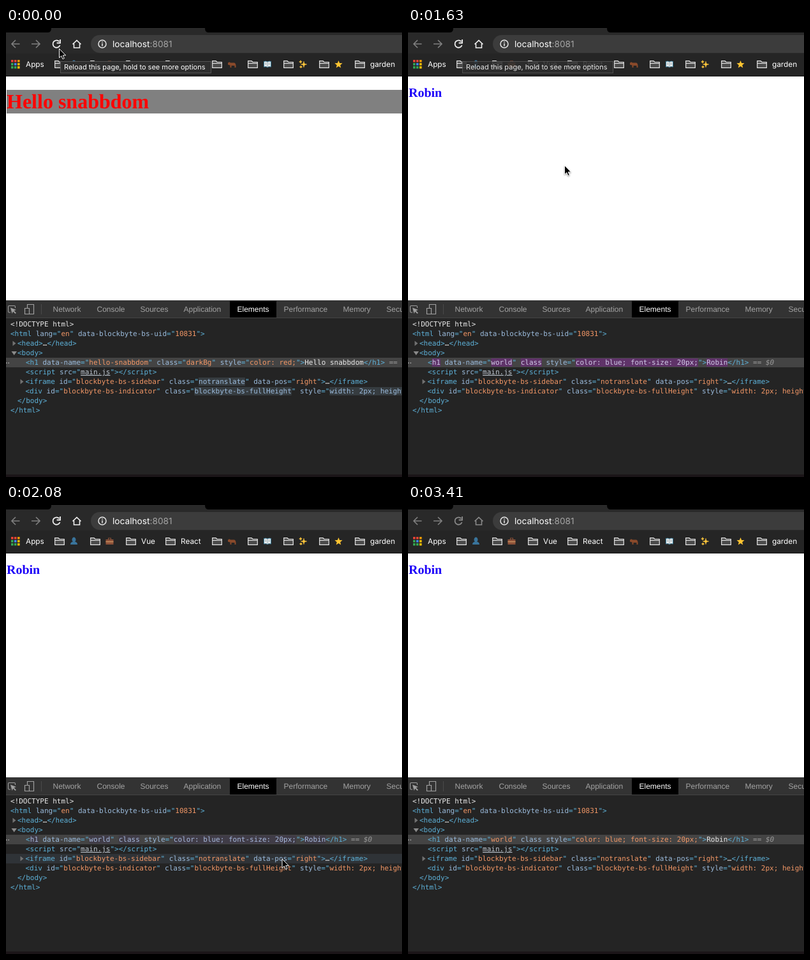
Write an HTML page that moves like this. It is 621 px wide and 704 px high and loops after 3510 ms.

```html
<!DOCTYPE html>
<html lang="en">
<head>
<meta charset="utf-8">
<title>Page reload with inspector</title>
<style>
html, body { margin: 0; width: 100%; height: 100%; overflow: hidden; background: #fff; }
svg { display: block; }
text { white-space: pre; text-rendering: geometricPrecision; }
.ui { font-family: Inter, sans-serif; fill: #fff; }
.tab { font: 12px "Liberation Sans", Arial, sans-serif; fill: #a3a3a3; }
.page { font-family: "Liberation Serif", Times, serif; font-weight: bold; }
.code { font: 11px "DejaVu Sans Mono", monospace; fill: #5db0d7; }
.a { fill: #9bbbdc; }
.v { fill: #f29766; }
.w { fill: #e8e8e8; }
.l { fill: #bdc6cf; text-decoration: underline; }
.g { fill: #9a9a9a; }
.i { fill: #9a9a9a; font-style: italic; }
</style>
</head>
<body>
<svg id="stage" width="621" height="704" viewBox="0 0 621 704"></svg>
<script>
const LOOP = 3510, CHAR = 6.6226;
const stage = document.getElementById('stage');

function add(tag, attrs, parent = stage, text) {
  const el = document.createElementNS('http://www.w3.org/2000/svg', tag);
  for (const k in attrs) el.setAttribute(k, attrs[k]);
  if (text !== undefined) el.textContent = text;
  return parent.appendChild(el);
}
const group = (parent = stage) => add('g', {}, parent);
const rect = (x, y, width, height, fill, parent, more) =>
  add('rect', { x, y, width, height, fill, ...more }, parent);
const path = (d, fill, parent, more) => add('path', { d, fill, ...more }, parent);
const line = (d, stroke, width, parent) =>
  path(d, 'none', parent, { stroke, 'stroke-width': width });
const label = (x, y, text, cls, style, parent, more) =>
  add('text', { x, y, class: cls, style, ...more }, parent, text);
const show = (el, on) => el.setAttribute('visibility', on ? 'visible' : 'hidden');

// Latest step whose start time has passed
const at = (steps, t) => steps.filter(s => s[0] <= t).pop();

// One line of markup: the first letter of a part is its colour class,
// an upper-case letter marks a part that flashes when it is updated.
function code(x, row, parts, parent, marks) {
  const y = 468 + row * 15;
  const back = group(parent);
  const text = add('text', { x, y, class: 'code' }, parent);
  let n = 0;
  for (const part of parts) {
    const kind = part[0].toLowerCase(), str = part.slice(1);
    const span = add('tspan', { class: kind }, text, str);
    if (kind !== part[0])
      marks.push({ span, box: rect(x + n * CHAR, y - 10, str.length * CHAR, 13, 'none', back) });
    n += str.length;
  }
}

function flash(marks, [, bg, ink]) {
  for (const m of marks) {
    m.box.setAttribute('fill', bg);
    m.span.style.fill = ink;
  }
}

// Browser toolbar
rect(0, 0, 621, 76, '#292929');
rect(0, 0, 621, 7, '#000');
path('M66 7Q71 7 71 0H312Q312 7 317 7Z', '#292929');
rect(133, 11, 520, 28, '#3c3c3c', stage, { rx: 14 });
rect(0, 40, 621, 35, '#252525');
rect(0, 75, 621, 1, '#151515');
line('M21.5 25H9M15 19L9 25L15 31', '#808080', 1.6);
line('M40 25H53M47 19L53 25L47 31', '#808080', 1.6);
const buttons = add('g', { 'stroke-width': 1.8 });
path('M83.5 21.2A5.7 5.7 0 1 0 84.6 27', 'none', buttons);
path('M85 18V23.5H79.6', 'none', buttons);
path('M104.5 25.5L111 19.3L117.5 25.5M106.5 24.5V31H115.5V24.5', 'none', buttons, { 'stroke-width': 1.6 });
add('circle', { cx: 151, cy: 25, r: 6, fill: 'none', stroke: '#e8e8e8', 'stroke-width': 1.5 });
line('M151 24V28.5M151 21.2V22.8', '#e8e8e8', 1.5);
const url = label(167, 30, 'localhost', 'ui', 'font-size:13.7px');
add('tspan', { fill: '#a5a5a5' }, url, ':8081');

// Bookmarks
const SMALL = 'font-size:11.8px';
['#ea4335', '#ea4335', '#f29900', '#34a853', '#4285f4', '#fbbc04', '#34a853', '#34a853', '#fbbc04']
  .forEach((c, i) => rect(8 + i % 3 * 5, 50 + (i / 3 | 0) * 5, 3.6, 3.6, c));
label(31, 61, 'Apps', 'ui', SMALL);
for (const x of [76, 132, 188, 250, 323, 379, 435, 491, 547]) {
  path(`M${x + .7} 62.3V51.7H${x + 6}L${x + 8} 53.5H${x + 15.3}V62.3Z`, '#4a4a4a', stage,
    { stroke: '#e6e6e6', 'stroke-width': 1.2 });
  line(`M${x + 1} 55.5H${x + 15}`, '#e6e6e6', 1.1);
}
label(212, 61, 'Vue', 'ui', SMALL);
label(274, 61, 'React', 'ui', SMALL);
label(571, 61, 'garden', 'ui', SMALL);
path('M101 62Q101 58 105 57.5A3 3.7 0 1 1 108 57.5Q112 58 112 62Z', '#39749b');
path('M156.5 54H160V51.5H165V54H168.5V62H156.5ZM161 54H164V52.5H161Z', '#8c5138', stage, { 'fill-rule': 'evenodd' });
rect(156.5, 57, 12, 1.2, '#d19a66');
path('M348 55Q350 52.5 352 54.5H358Q361 55 360.5 62H358.5V59H353.5V62H351.5V58.5L348 57.5Z', '#8a4a2b');
path('M404.5 52.5Q407.5 51.5 410 53Q412.5 51.5 415.5 52.5V61Q412.5 60 410 61.5Q407.5 60 404.5 61Z', '#e9eef0', stage,
  { stroke: '#3f7f9c', 'stroke-width': 1 });
line('M410 53V61M406 55H408.5M406 57H408.5M411.5 55H414M411.5 57H414', '#8a979d', .8);
const spark = (x, y, r) =>
  path(`M${x} ${y - r}Q${x} ${y} ${x + r} ${y}Q${x} ${y} ${x} ${y + r}Q${x} ${y} ${x - r} ${y}Q${x} ${y} ${x} ${y - r}`,
    '#ffc83d', stage, { stroke: '#ffc83d', 'stroke-width': .8 });
spark(467, 57, 4.5);
spark(462, 53, 2.2);
spark(462.5, 61, 2);
const star = Array.from({ length: 10 }, (_, i) => {
  const a = i * Math.PI / 5, r = i % 2 ? 2.8 : 6.4;
  return [521.5 + r * Math.sin(a), 57.3 - r * Math.cos(a)];
});
path('M' + star.join('L') + 'Z', '#ffc531');

const tip = group();
rect(85.5, 52.5, 236, 18, '#2e2e2e', tip, { stroke: '#555' });
label(91, 65, 'Reload this page, hold to see more options', 'ui', 'font-size:11px', tip);

// Page
rect(0, 76, 621, 351, '#fff');
const before = group(), after = group();
rect(1, 97, 620, 37, '#808080', before);
label(1, 126, 'Hello snabbdom', 'page', 'font-size:32px', before, { fill: '#f00' });
const overlay = group(after);
rect(1, 81, 620, 39, '#f9cc9d', overlay);
rect(1, 89, 620, 23, '#a0c5e8', overlay);
const title = label(1, 107.5, 'Robin', 'page', 'font-size:20px', after);
const badge = group(after);
rect(-4, 130, 116, 30, '#000', badge, { rx: 3, opacity: .12 });
rect(-4, 129, 114, 29, '#000', badge, { rx: 3, opacity: .15 });
path('M-4 128H7L14 121.5L21 128H106Q109 128 109 131V154Q109 157 106 157H-4Z', '#fff', badge,
  { stroke: '#ddd', 'stroke-width': .6 });
label(4, 147, 'body', 'tab', 'font-size:13px;font-weight:bold;fill:#881280', badge);
label(45, 147, '1424\u2009×\u200923', 'tab', 'font-size:13px;fill:#777', badge);

// Inspector
rect(0, 427, 621, 277, '#242424');
rect(0, 427, 621, 28, '#333');
rect(0, 454, 621, 1, '#444');
rect(351, 428, 73, 26, '#000');
rect(55, 433, 1, 16, '#4a4a4a');
line('M7 446H5Q3.5 446 3.5 444.5V437Q3.5 435.5 5 435.5H13Q14.5 435.5 14.5 437V439', '#a0a0a0', 1.1);
path('M7 438.5L16 442L12.5 443.2L16 446.7L14.6 448L11 444.5L9.6 448Z', '#a0a0a0');
line('M33.5 439V433.5H43.5V448.5H37M29.5 439.5H36.5V448.5H29.5Z', '#a0a0a0', 1.2);
[[73.5, 'Network'], [142.5, 'Console'], [210.5, 'Sources'], [278.5, 'Application'], [362.5, 'Elements'],
 [435.5, 'Performance'], [528.5, 'Memory'], [596.5, 'Security']].forEach(([x, name]) =>
  label(x, 445, name, 'tab', name === 'Elements' ? 'fill:#fff' : ''));

rect(0, 517, 621, 15, '#444');
const hover = rect(0, 547, 621, 15, '#2f3337');
for (const x of [0, 3.5]) rect(x, 524.5, 1.5, 1.5, '#aaa');
const oldRow = group(), newRow = group();
const loaded = [], changed = [];
code(7, 0, ['w<!DOCTYPE html>']);
code(7, 1, ['t<html', 'a lang', 't="', 'ven', 't"', 'a data-blockbyte-bs-uid', 't="', 'v10831', 't">']);
code(18, 2, ['t<head>', 'w…', 't</head>']);
code(18, 3, ['t<body>']);
code(31, 4, ['t<h1', 'a data-name', 't="', 'vhello-snabbdom', 't"', 'a class', 't="', 'vdarkBg', 't"', 'a style',
  't="', 'vcolor: red;', 't">', 'wHello snabbdom', 't</h1>', 'g == ', 'i$0'], oldRow);
code(31, 4, ['t<', 'Th1', 'a data-name', 't="', 'Vworld', 't" ', 'Aclass', 'a style', 't="',
  'Vcolor: blue; font-size: 20px;', 't">', 'WRobin', 't</h1>', 'g == ', 'i$0'], newRow, changed);
code(31, 5, ['t<script', 'a src', 't="', 'lmain.js', 't"><\/script>']);
code(30.5, 6, ['t<iframe', 'a id', 't="', 'vblockbyte-bs-sidebar', 't"', 'a class', 't="', 'Vnotranslate', 't"',
  'a data-pos', 't="', 'vright', 't">', 'w…', 't</iframe>'], stage, loaded);
code(30.5, 7, ['t<div', 'a id', 't="', 'vblockbyte-bs-indicator', 't"', 'a class', 't="',
  'Vblockbyte-bs-fullHeight', 't"', 'a style', 't="', 'Vwidth: 2px; height'], stage, loaded);
code(18, 8, ['t</body>']);
code(7, 9, ['t</html>']);
path('M10.5 490.5L15.5 494.5L10.5 498.5Z', '#727272');
path('M22.5 550.5L27.5 554.5L22.5 558.5Z', '#727272');
path('M8.5 507H17L12.7 513Z', '#8a8a8a');
rect(0, 700, 621, 4, '#1b1518');

const cursor = path('M0 0V14.2L3.3 11.2L5.5 16.2L7.9 15.1L5.7 10.4H10.2Z', '#000', stage,
  { stroke: '#fff', 'stroke-width': 1, 'stroke-linejoin': 'round', style: 'filter:drop-shadow(0 1px 1px #0006)' });

// Steps: start time, then values
const moves = [[0, 83.5, 32.5], [1340, 147.5, 97.5], [1480, 194, 150], [1630, 245.5, 215.5],
  [1780, 328, 372], [1930, 406.5, 523.5], [2080, 433, 555], [2230, 515.5, 678.5]];
const tipFade = [[0, 1], [1480, .97], [1630, .88], [1780, .6], [1930, .25], [2080, 0]];
const loadFlash = [[0, '#363c40', '#9bbbdc'], [150, '#2f3335', '#b0b3be'], [290, '#292b2c', '#d0a694'],
  [440, 'none', '']];
const editFlash = [[0, 'none', ''], [1480, '#6d2f7c', '#e6dcf2'], [1630, '#5f3369', '#cfc8e6'],
  [1780, '#543862', '#bdbfe2'], [1930, '#493a52', '#b0b8de'], [2080, '#403c47', '#a6b8dc'],
  [2230, '#3a3c40', '#a3bbda'], [2520, '#404143', '#c8a9a0'], [2670, 'none', '']];

function draw(t) {
  const edited = t >= 1480, hovering = t >= 1930 && t < 2080;
  show(before, t < 1340);
  show(title, t >= 1340);
  show(overlay, hovering);
  show(badge, hovering);
  title.setAttribute('fill', hovering ? '#4a6ee6' : '#1c00f8');
  show(oldRow, !edited);
  show(newRow, edited);
  show(hover, t >= 2080 && t < 2230);
  tip.setAttribute('opacity', at(tipFade, t)[1]);
  flash(loaded, at(loadFlash, t));
  flash(changed, at(editFlash, t));
  const [, x, y] = at(moves, t);
  cursor.setAttribute('transform', `translate(${x} ${y})`);
  show(cursor, t < 2520);
  buttons.setAttribute('stroke', t < 3410 ? '#f0f0f0' : '#8a8a8a');
}

const start = performance.now();
function tick() {
  draw((performance.now() - start) % LOOP);
  requestAnimationFrame(tick);
}
draw(0);
requestAnimationFrame(tick);
</script>
</body>
</html>
```
